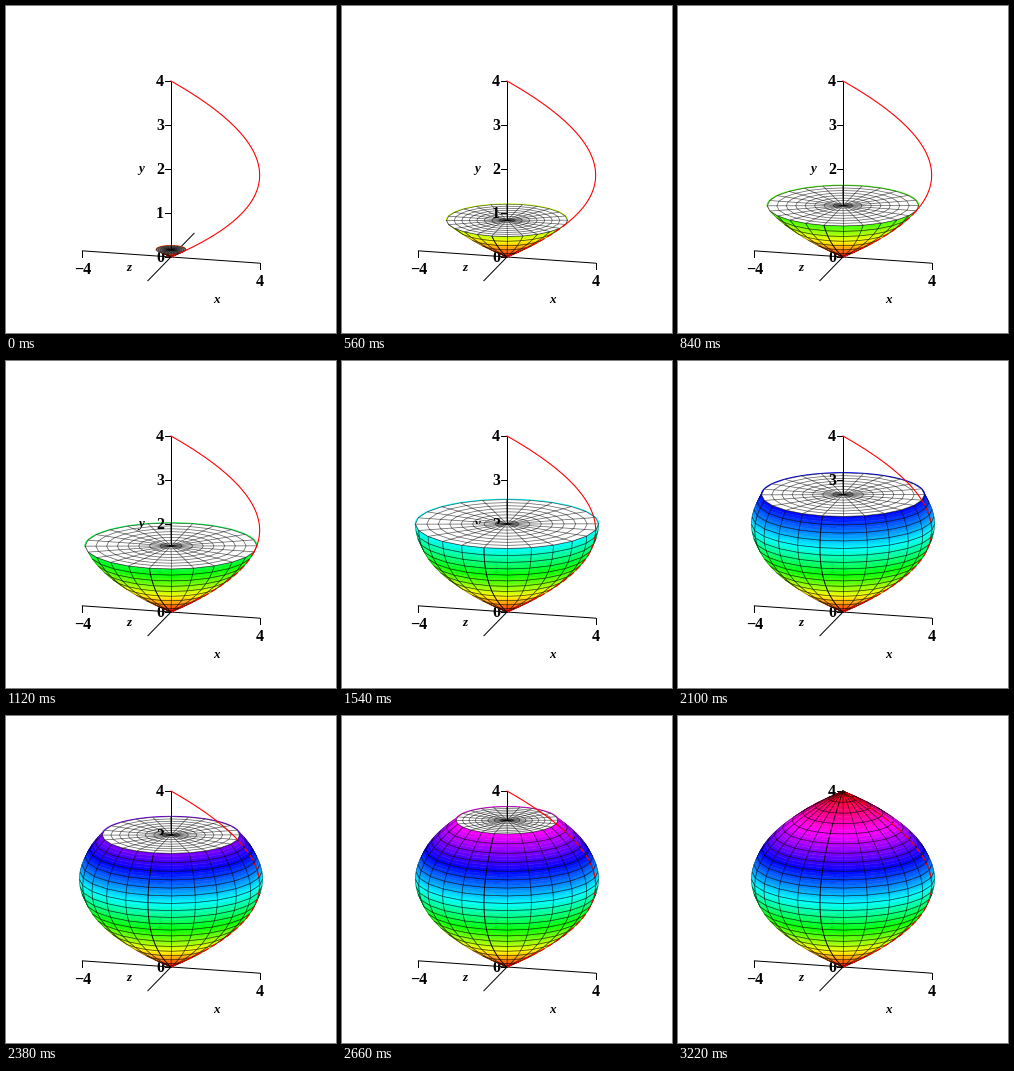
These frames come from a looping animation (330 by 327 pixels, 3.36 s). A matplotlib script:

```python
import colorsys
import math

import numpy as np
import matplotlib.pyplot as plt
from matplotlib.animation import FuncAnimation
from matplotlib.collections import LineCollection, PolyCollection
from matplotlib.patches import Rectangle

W, H, DPI = 330, 327, 100
STEPS, SECTORS, RINGS, SUB = 24, 24, 8, 3
PX = 72 / DPI                        # one pixel in points

CX, CY = 165.0, 251.0                # origin on screen
RX, RY, UP = 22.9, 6.12, 44.0        # pixels per unit
TURN = math.radians(14.6)            # azimuth of the z axis, left of the viewer
PHI = np.linspace(0, 2 * np.pi, SECTORS + 1) - TURN


def radius(y):
    return 4 * y - y * y


def project(r, phi, y):
    """Screen position of a point at height y, angle phi from the viewer."""
    r, phi, y = np.broadcast_arrays(r, phi, y)
    return np.stack([CX + RX * r * np.sin(phi),
                     CY - UP * y + RY * r * np.cos(phi)], axis=-1)


def hue(y):
    return colorsys.hsv_to_rgb(min(y / 4, 1), 1, 1)


def quads(y0, y1):
    """Visible faces of one belt, with the cosine of each face's angle."""
    a = project(radius(y0), PHI, y0)
    b = project(radius(y1), PHI, y1)
    for i in range(SECTORS):
        q = np.array([a[i], a[i + 1], b[i + 1], b[i]])
        x, y = q[:, 0], q[:, 1]
        area = np.sum(x * np.roll(y, -1) - y * np.roll(x, -1))
        if area < 0:
            yield q, math.cos((PHI[i] + PHI[i + 1]) / 2)


fig = plt.figure(figsize=(W / DPI, H / DPI), dpi=DPI, facecolor="white")
ax = fig.add_axes([0, 0, 1, 1])


def stroke(pts, color="black", width=1.0, z=2.0, **kw):
    pts = np.asarray(pts)
    return ax.plot(pts[:, 0], pts[:, 1], color=color, lw=width * PX, zorder=z, **kw)[0]


def label(x, y, text, size=16, ha="center", style="normal"):
    ax.text(x, y, text, fontsize=size * PX, family="Liberation Serif",
            weight="bold", style=style, ha=ha, va="baseline", zorder=2)


def draw_axes():
    right = project(4, math.pi / 2 - TURN, 0)
    left = project(4, -math.pi / 2 - TURN, 0)
    front = project(4, -TURN, 0)
    back = project(4, math.pi - TURN, 0)
    stroke([left, right])
    stroke([front, (CX, CY)])
    stroke([(CX, CY), back], z=0)
    stroke([(CX, CY), (CX, CY - 4 * UP)], snap=True)
    for end in (left, right):
        stroke([end, end + [0, 6]], snap=True)
    for n in range(5):
        y = CY - UP * n
        stroke([(CX - 6, y), (CX, y)], snap=True)
        label(158, y + 5.5, str(n), ha="right")
    label(77, 267.5, "\u22124")
    label(253.5, 279.5, "4")
    label(135, 166, "y", 13, style="italic")
    label(122.5, 265, "z", 13, style="italic")
    label(210, 297, "x", 13, style="italic")


def draw_surface(top, belts):
    faces = {1: [], 3: []}
    colors = {1: [], 3: []}
    mesh = {1: [], 3: []}
    ys = [4 * k / STEPS for k in range(belts + 1)]
    for y0, y1 in zip(ys, ys[1:]):
        for q, c in quads(y0, y1):
            mesh[3 if c > 0 else 1].append(q)
        sub = np.linspace(y0, y1, SUB + 1)
        for s0, s1 in zip(sub, sub[1:]):
            for q, c in quads(s0, s1):
                layer = 3 if c > 0 else 1
                faces[layer].append(q)
                colors[layer].append(hue((s0 + s1) / 2))
    for z in (1, 3):
        if faces[z]:
            ax.add_collection(PolyCollection(
                faces[z], facecolors=colors[z], edgecolors=colors[z],
                linewidths=0.4 * PX, zorder=z))
            ax.add_collection(PolyCollection(
                mesh[z], facecolors="none", edgecolors=(0, 0, 0, 0.45),
                linewidths=0.7 * PX, zorder=z + 0.1))
    y = np.array(ys)
    stroke(project(radius(y), -TURN, y), width=0.9, z=3.2, alpha=0.7)


def draw_cap(top):
    r = radius(top)
    if r < 1e-6:
        return
    rim = project(r, PHI, top)
    center = project(0, 0, top)
    rear = np.linspace(np.pi / 2, 3 * np.pi / 2, 40)
    stroke(project(r, rear, top), color=hue(top), width=1.6, z=1.15)
    lines = [project(r * k / RINGS, PHI, top) for k in range(1, RINGS + 1)]
    lines += [np.array([center, p]) for p in rim[:-1]]
    # the near half also hides the axis and its labels
    for z, y0, h in ((1.2, 0, H), (3.3, center[1], H)):
        parts = (PolyCollection([rim], facecolors="white", edgecolors="none", zorder=z),
                 LineCollection(lines, colors=[(0, 0, 0, 0.6)],
                                linewidths=0.75 * PX, zorder=z + 0.1))
        for part in parts:
            ax.add_collection(part)
            part.set_clip_path(Rectangle((0, y0), W, h, transform=ax.transData))


def draw_curve(top):
    def part(a, b, **kw):
        y = np.linspace(a, b, 80)
        stroke(project(radius(y), math.pi / 2 - TURN, y), color="red", z=4, **kw)

    part(0, top, width=1.2, dashes=(5, 2.5))
    if top < 4:
        part(top, 4, width=1.1)


def draw(i):
    ax.clear()
    ax.set_axis_off()
    ax.set_xlim(0, W)
    ax.set_ylim(H, 0)
    top = 4 * (i + 1) / STEPS
    draw_axes()
    draw_surface(top, i + 1)
    draw_cap(top)
    draw_curve(top)
    return []


anim = FuncAnimation(fig, draw, frames=STEPS, interval=140, repeat=True,
                     repeat_delay=0, blit=False)
plt.show()
```
